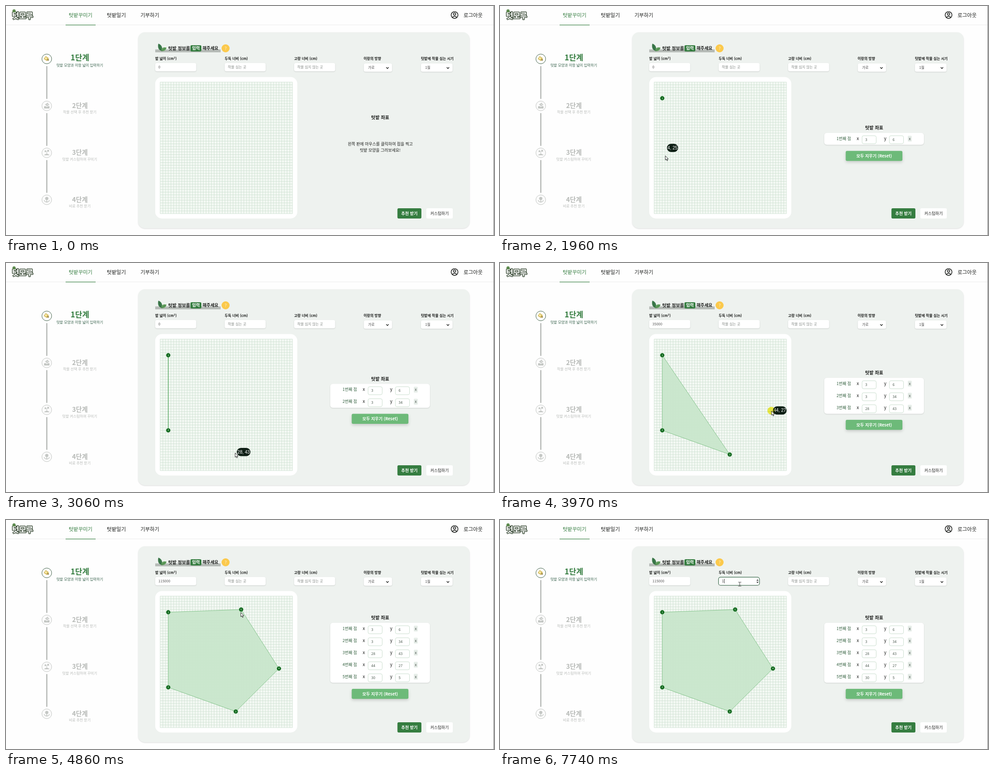
Recreate the animation shown at these times as an HTML page. Size 1089 by 514 pixels, loop 8000 ms.

```html
<!DOCTYPE html>
<html lang="ko">
<head>
<meta charset="utf-8">
<title>텃밭꾸미기</title>
<style>
  html, body { margin: 0; width: 100%; height: 100%; overflow: hidden; background: #fefefe; }
  svg { display: block; width: 100%; height: 100%; }
  text { font-family: "Noto Sans CJK KR", "Noto Sans CJK", "Noto Sans KR", sans-serif; }
  .hint text { font-family: "Liberation Sans", Arial, sans-serif; }
  .soft { filter: drop-shadow(0 1px 1px rgba(0, 0, 0, .14)); }
  .deep { filter: drop-shadow(0 3px 3px rgba(0, 0, 0, .16)); }
  #glow { mix-blend-mode: multiply; }
</style>
</head>
<body>
<svg id="stage" viewBox="0 0 1089 514" xmlns="http://www.w3.org/2000/svg"></svg>
<script>
const GREEN = '#357d40', INK = '#1b1d1b', GREY = '#b7bab7', HOLDER = '#858a86';
const LOOP = 8000, UNIT = 6.025, GX = 344, GY = 170.8, CELLS = 49;

const points = [[3, 6], [3, 34], [28, 43], [44, 27], [30, 5]];
const clicks = [1450, 2380, 3270, 4040, 4690];
const FOCUS = 5800, TYPED = 7740;

// time, x, y of the pointer
const path = [
  [130, 952, 469], [200, 905, 440], [340, 690, 350], [480, 500, 262], [620, 400, 221], [760, 373, 209],
  [1030, 373, 209], [1170, 369, 214], [1230, 367, 217], [1380, 366, 206], [1740, 366, 206],
  [1820, 368, 224], [1900, 368.5, 320], [1960, 369, 336], [2150, 365, 370], [2340, 362, 379],
  [2710, 362, 379], [2800, 395, 392], [2930, 480, 418], [3000, 511, 426], [3200, 512, 427],
  [3550, 512, 427], [3650, 538, 400], [3800, 588, 350], [3900, 605, 333], [3970, 606, 332],
  [4380, 606, 332], [4460, 590, 300], [4560, 550, 235], [4660, 526, 207], [4800, 524, 207.5],
  [5120, 524, 207.5], [5300, 525, 195], [5500, 526, 160], [5700, 527, 138], [5870, 527, 135],
  [5930, 536, 142], [6260, 536, 142], [6400, 534, 144], [6700, 534, 144], [6730, 535, 144]
];

const rect = (x, y, w, h, fill, r = 0, more = '') =>
  `<rect x="${x}" y="${y}" width="${w}" height="${h}" rx="${r}" fill="${fill}" ${more}/>`;
const disc = (x, y, r, fill, more = '') => `<circle cx="${x}" cy="${y}" r="${r}" fill="${fill}" ${more}/>`;
const line = (d, stroke, w = 1, more = '') =>
  `<path d="${d}" fill="none" stroke="${stroke}" stroke-width="${w}" ${more}/>`;
const text = (x, y, size, str, fill = INK, weight = 400, anchor = 'start', more = '') =>
  `<text x="${x}" y="${y + size * .36}" font-size="${size}" font-weight="${weight}" fill="${fill}" text-anchor="${anchor}" ${more}>${str}</text>`;
const px = ([x]) => GX + x * UNIT, py = ([, y]) => GY + y * UNIT;

function header() {
  return rect(0, 42, 1089, 1, '#ececec') + rect(133, 42, 67, 1.2, GREEN) +
    text(13.5, 21.5, 17, '텃모루', '#fff', 900, 'start',
      'stroke="#3c4d39" stroke-width="3" stroke-linejoin="round" paint-order="stroke"') +
    disc(18, 11, 3.6, '#5c8a4d') +
    text(140, 20.5, 11.5, '텃밭꾸미기', GREEN, 500) +
    text(225, 20.5, 11.6, '텃밭일기', INK, 500) +
    text(300, 20.5, 11.4, '기부하기', INK, 500) +
    text(1021, 20.5, 11.6, '로그아웃', INK, 500) +
    disc(1001, 20.3, 7.6, 'none', `stroke="${INK}" stroke-width="1.6"`) +
    disc(1001, 18, 2.6, 'none', `stroke="${INK}" stroke-width="1.5"`) +
    line('M995.8 25.6Q1001 20.6 1006.2 25.6', INK, 1.5) +
    rect(1088, 0, 1, 514, '#777');
}

function steps() {
  const subs = ['텃밭 모양과 이랑 넓이 입력하기', '작물 선택 후 추천 받기', '텃밭 커스텀하여 꾸미기', '비료 추천 받기'];
  const icons = [
    `<g transform="rotate(35 90 118)">${rect(85.5, 114, 9, 8, '#d9c06a', 1)}${disc(89, 118, 2, '#fff3b8')}</g>` +
      disc(94, 121, 1.8, '#8b7a3a'),
    line('M88 222L94 218M90 224L96 221', '#c4c7c4', 2.4) + `<path d="M85 225h4l2 2 2-2h4v5h-12z" fill="#c4c7c4"/>`,
    disc(88, 326, 2, '#c4c7c4') + disc(94, 325, 2.2, '#c4c7c4') + line('M91 332V326', '#c4c7c4') +
      `<path d="M84.500 335q6.500-7 13 0z" fill="#c4c7c4"/>`,
    disc(91, 432, 3.6, '#c4c7c4') + line('M91 435v6M85 436q2 4 6 4q4 0 6-4', '#c4c7c4', 1.6)
  ];
  return subs.map((sub, i) => {
    const y = 118.8 + i * 105.4, on = i === 0;
    return (i < 3 ? rect(89.8, y + 16.200, 2.5, 73.500, '#b3b6b3') : '') +
      disc(91, y, 10.9, on ? '#fff' : '#fbfbfb', `stroke="${on ? '#3f5f48' : '#c2c5c2'}"`) + icons[i] +
      text(165, on ? 116 : y - .3, on ? 17.2 : 14.4, `${i + 1}단계`, on ? GREEN : GREY, 700, 'middle') +
      text(164.6, on ? 133 : y + 14.4, 7.95, sub, on ? '#35604a' : GREY, 400, 'middle');
  }).join('');
}

function form() {
  const labels = [[333, '밭 넓이 (cm²)'], [488, '두둑 너비 (cm)'], [643, '고랑 너비 (cm)'], [798, '이랑의 방향'], [926, '텃밭에 작물 심는 시기']];
  const select = (x, w, str) => rect(x, 129, w, 18.600, '#fff', 4, 'class="soft"') + text(x + 9.5, 138, 7.8, str, '#444') +
    line(`M${x + w - 13} 137.600l2.700 2.800l2.700-2.800`, INK, 1.4);
  return rect(295, 59, 739.5, 440, '#eef2ef', 15, 'class="soft"') +
    rect(333, 97.5, 146, 6.5, '#b6bbb7') +
    '<path d="M348 101C340 100 338 92 340 84.500C347 87 350 93 348 101z" fill="#3c7a4a"/>' +
    '<path d="M346 101C347 94 352 91 358 93.500C357 100 352 102 346 101z" fill="#62a05c"/>' +
    line('M341 87Q344 96 347.500 101L356 94.500', '#28543a', .6) +
    text(362, 95, 10, '텃밭 정보를', INK, 700) + rect(411.5, 88, 24.500, 14, GREEN, 3) +
    text(423.8, 95, 9.4, '입력', '#fff', 700, 'middle') + text(438.5, 95, 9.6, '해주세요', INK, 700) +
    disc(490, 95, 9, '#fbc94c') + text(490, 95, 10, '?', '#fff3d0', 500, 'middle') +
    labels.map(([x, s]) => text(x, 118, 8, s, INK, 600)).join('') +
    [333, 488, 643].map(x => rect(x, 128, 91.5, 18.500, '#fff', 4, 'class="soft"')).join('') +
    text(650, 137, 7.9, '작물 심지 않는 곳', HOLDER) +
    select(798.5, 63, '가로') + select(926, 70.5, '1월') +
    rect(333, 159.5, 317, 317.500, '#fff', 15) +
    rect(873.5, 454, 53.5, 23, GREEN, 3) + text(900.3, 465.5, 9.2, '추천 받기', '#fff', 700, 'middle') +
    rect(938, 454, 59, 23, '#fff', 3) + text(967.5, 465.5, 8.9, '커스텀하기', INK, 500, 'middle');
}

function grid() {
  const size = CELLS * UNIT;
  let d = '';
  for (let i = 0; i <= CELLS; i++) {
    const k = i * UNIT;
    d += `M${GX + k} ${GY}v${size}M${GX} ${GY + k}h${size}`;
  }
  return rect(GX, GY, size, size, '#f4f9f4') + line(d, '#cbdfcf', .8);
}

function plot(n) {
  const used = points.slice(0, n), d = 'M' + used.map(p => `${px(p)} ${py(p)}`).join('L');
  const shape = n > 2 ? `<path d="${d}z" fill="#c9e7cc" fill-opacity=".96" stroke="#76bd7e" stroke-width=".9"/>`
    : n === 2 ? line(d, '#3c9a48', 1.2) : '';
  return shape + used.map((p, i) => disc(px(p), py(p), 4.7, '#126a1e') +
    text(px(p), py(p), 5, i + 1, '#fff', 500, 'middle')).join('');
}

function coords(n) {
  const title = y => text(835, y, 10.2, '텃밭 좌표', INK, 700, 'middle');
  if (!n) return title(250) + text(835.3, 309.5, 9, '왼쪽 판에 마우스를 클릭하여 점을 찍고', INK, 400, 'middle') +
    text(835, 323.500, 9, '텃밭 모양을 그려보세요!', INK, 400, 'middle');
  const top = 298.1 - 13.45 * n, end = top + 26.9 * n;
  const box = (x, y, v) => rect(x, y + 6.5, 31.5, 18, '#fff', 3.5, 'stroke="#c3dac8" stroke-width=".9"') +
    text(x + 7, y + 15.3, 8.2, v, '#4d5c51');
  const row = ([x, y], i) => {
    const t = top + i * 26.95;
    return text(751, t + 12.8, 9, `${i + 1}번째 점`, '#33603f', 500) +
      text(796, t + 12.5, 10, 'x', INK, 500) + box(808, t, x) +
      text(857, t + 12.5, 10, 'y', INK, 500) + box(869, t, y) +
      rect(910, t + 6.5, 8.8, 13, '#e6ede8', 1.500) + text(914.4, t + 12.8, 8.5, 'x', '#4b544e', 400, 'middle');
  };
  return title(top - 11.2) + rect(723.5, top, 222.500, end - top, '#fff', 6, 'class="soft"') +
    points.slice(0, n).map(row).join('') +
    rect(771.5, end + 13.6, 126.500, 22.500, '#6dba79', 3, 'class="deep"') +
    text(835, end + 24.9, 9.2, '모두 지우기 (Reset)', '#fff', 700, 'middle');
}

function area(n) {
  if (n < 3) return 0;
  const sum = points.slice(0, n).reduce((s, [x, y], i) => {
    const [u, v] = points[(i + 1) % n];
    return s + x * v - u * y;
  }, 0);
  return Math.abs(sum) * 50;
}

function ridge(focus, typed, caret) {
  const cx = typed ? 500 : 494.5;
  return (focus ? rect(487.6, 128.3, 91.400, 18.200, '#fff', 4.5, 'stroke="#3a6b4b" stroke-width="1.2"') +
    '<path d="M572.200 136.300l2.400-3l2.400 3zM572.200 138.700l2.400 3l2.400-3z" fill="#333"/>' : '') +
    (typed ? text(495, 137, 8, '1', '#444') : text(495, 137, 8, '작물 심는 곳', HOLDER)) +
    (caret ? rect(cx, 132, .9, 10, '#222') : '');
}

const stage = document.getElementById('stage');
stage.innerHTML = header() + steps() + form() + grid() +
  '<g id="plot"></g><g id="coords"></g><g id="area"></g><g id="ridge"></g>' +
  `<g id="hint" class="hint">${rect(0, -9, 20, 18.400, '#0e1f15', 9.2)}` +
  `<text y="3.500" font-size="10" fill="#fff" text-anchor="middle"></text></g>` +
  disc(0, 0, 8.7, '#f6ef45', 'id="glow"') +
  '<path id="arrow" d="M0 0V9.600L2.200 7.700L3.700 11.200L5.300 10.500L3.800 7.200H6.700z" fill="#fff" stroke="#111" stroke-width=".9" stroke-linejoin="round"/>' +
  `<g id="beam">${line('M-3.500-4.500H-.8L0-4L.8-4.500H3.500M0-4V4M-3.500 4.500H-.8L0 4L.8 4.500H3.500', '#555', 1.200)}</g>`;

const el = Object.fromEntries([...stage.querySelectorAll('[id]')].map(e => [e.id, e]));
const [pill, label] = el.hint.children;
const show = (e, on) => e.setAttribute('visibility', on ? 'visible' : 'hidden');
const move = (e, x, y) => e.setAttribute('transform', `translate(${x} ${y})`);

function pointer(t) {
  const i = path.findIndex(k => k[0] > t);
  if (i === 0) return path[0].slice(1);
  if (i < 0) return path[path.length - 1].slice(1);
  const [t0, x0, y0] = path[i - 1], [t1, x1, y1] = path[i], k = (t - t0) / (t1 - t0);
  return [x0 + (x1 - x0) * k, y0 + (y1 - y0) * k];
}

let lastCount = -1, lastField = '';

function draw(t) {
  const n = clicks.filter(c => t >= c).length;
  if (n !== lastCount) {
    lastCount = n;
    el.plot.innerHTML = plot(n);
    el.coords.innerHTML = coords(n);
    el.area.innerHTML = text(340, 137, 8, area(n), '#555');
  }

  const caret = (t >= FOCUS && t < 6400) || (t >= 6930 && t < 7390) || t >= TYPED;
  const field = [t >= FOCUS, t >= TYPED, caret];
  if (field.join() !== lastField) {
    lastField = field.join();
    el.ridge.innerHTML = ridge(...field);
  }

  const [x, y] = pointer(t), live = t >= 130;
  const typing = y < 148;
  move(el.arrow, x, y);
  move(el.beam, x, y);
  show(el.arrow, live && !typing);
  show(el.beam, live && typing);

  move(el.glow, x - .5, y - .5);
  show(el.glow, [...clicks, FOCUS].some(c => t >= c - 90 && t < c + 120));

  // the label trails the pointer slightly
  const [lx, ly] = pointer(t - 60), hx = lx + 4, hy = ly - 2;
  const inside = x > GX && x < GX + 296 && y > GY && y < GY + 296 && lx < 640 && ly < 466;
  const onPoint = points.slice(0, n).some(p => Math.hypot(px(p) - x, py(p) - y) < 9);
  show(el.hint, live && inside && !onPoint);
  const str = `${Math.round((hx - 3 - GX) / UNIT)}, ${Math.round((hy + 3 - GY) / UNIT)}`;
  const w = 2.7 + [...str].reduce((s, c) => s + (/\d/.test(c) ? 5.56 : 2.78), 0);
  move(el.hint, hx, hy);
  pill.setAttribute('width', w);
  label.setAttribute('x', w / 2);
  label.textContent = str;
}

const start = performance.now();
(function tick() {
  draw((performance.now() - start) % LOOP);
  requestAnimationFrame(tick);
})();
</script>
</body>
</html>
```
